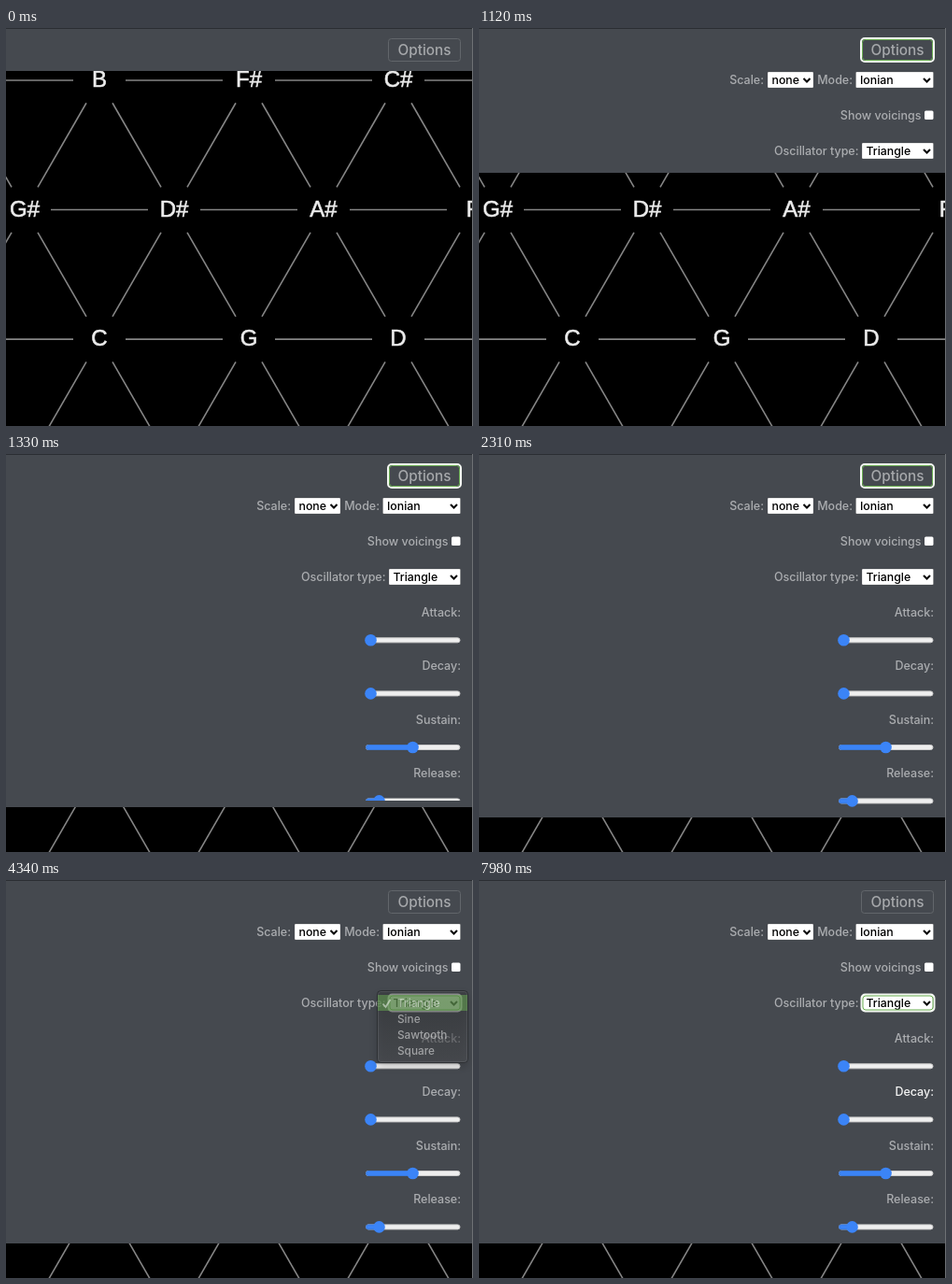
An HTML page with a canvas that plays this animation: 500x426 px, repeating every 8 s.

```html
<!DOCTYPE html>
<html lang="en">
<head>
<meta charset="utf-8">
<title>Note lattice options</title>
<style>
  html, body { margin: 0; width: 100%; height: 100%; overflow: hidden; background: #000; }
  canvas { display: block; }
</style>
</head>
<body>
<canvas id="stage" width="500" height="426"></canvas>
<script>
const c = document.getElementById('stage').getContext('2d');
const LOOP = 8000, STEP = 70;
const SANS = 'Inter, Roboto, sans-serif';
const PANEL = '#45494f', DIM = '#abadb0', GREEN = '#6bb052', BLUE = '#3b84f7';
const OPENING = [46, 56, 155, 271, 343, 378, 389];   // panel bottom per step
const OPEN_AT = 980, MENU_AT = 3290, CLOSE_AT = 4130;

const within = (t, a, b) => t >= a && t < b;

function text(s, x, y, { size = 12.5, color = DIM, align = 'left', weight = 500 } = {}) {
  c.font = `${weight} ${size}px ${SANS}`;
  c.fillStyle = color;
  c.textAlign = align;
  c.fillText(s, x, y);
}

function box(x, y, w, h, r, fill, stroke, line = 1) {
  c.beginPath();
  c.roundRect(x, y, w, h, r);
  if (fill) { c.fillStyle = fill; c.fill(); }
  if (stroke) { c.strokeStyle = stroke; c.lineWidth = line; c.stroke(); }
}

function path(points, color, width) {
  c.beginPath();
  points.forEach(([x, y]) => c.lineTo(x, y));
  c.strokeStyle = color;
  c.lineWidth = width;
  c.stroke();
}

function noteName(s, x, y) {
  c.font = '24px "Liberation Sans", Arial, sans-serif';
  c.textAlign = 'center';
  c.fillStyle = c.strokeStyle = '#ececec';
  c.lineWidth = 0.6;
  c.fillText(s, x, y);
  c.strokeText(s, x, y);
}

function lattice() {
  const side = 160, rise = side * Math.sqrt(3) / 2, gap = 28 / side;
  const rows = [['E', 'B', 'F#', 'C#', 'G#'], ['G#', 'D#', 'A#', 'F'], ['F', 'C', 'G', 'D', 'A'], ['', '', '', '']];
  rows.forEach((row, j) => row.forEach((note, i) => {
    const x = (j % 2 ? 20 : -60) + i * side, y = 56 + j * rise;
    for (const [dx, dy] of [[side, 0], [side / 2, rise], [-side / 2, rise]])
      path([gap, 1 - gap].map(k => [x + dx * k, y + dy * k]), '#858585', 1.6);
    noteName(note, x, y + 7.2);
  }));
}

function focusRing(x, y, w, h) {
  box(x, y, w, h, 4, null, '#f4f8f2', 2);
  box(x + 1.5, y + 1.5, w - 3, h - 3, 3, null, GREEN, 1);
}

function select(label, x, y, w) {
  box(x, y, w, 17, 1, '#fff', 'rgba(90,90,90,.5)', 0.5);
  text(label, x + 4.5, y + 13, { size: 12.3, color: '#000' });
  const a = x + w - 10.5;
  path([[a, y + 7], [a + 3.5, y + 10.5], [a + 7, y + 7]], '#000', 2);
}

function slider(label, y, value, bright, hover) {
  text(label, 487, y - 25, { align: 'right', color: bright ? '#f4f4f4' : DIM });
  const x = 390.5 + value * 90;
  box(385.5, y - 2.5, 100.5, 5, 2.5, hover ? '#dadada' : '#efefef', hover ? '#b8b8b8' : '#cbcbcb');
  box(385.5, y - 2.5, x - 385, 5, 2.5, BLUE, '#3a78d8');
  box(x - 6.3, y - 6.3, 12.6, 12.6, 6.3, BLUE);
}

function menu(t) {
  const fade = 1 - Math.max(0, t - CLOSE_AT - STEP) / 280;
  if (t < MENU_AT || fade <= 0) return;
  const row = within(t, 3710, 3780) ? 1 : within(t, 3780, 3850) ? 2 : 0;
  const fill = c.createLinearGradient(0, 119, 0, 195);
  fill.addColorStop(0, '#37393c');
  fill.addColorStop(1, '#515357');
  c.save();
  c.globalAlpha = fade;
  c.shadowColor = 'rgba(0,0,0,.4)';
  c.shadowBlur = 10;
  c.shadowOffsetY = 4;
  box(397.5, 118.5, 97, 77, 4, fill);
  c.shadowColor = 'transparent';
  box(397.5, 118.5, 97, 77, 4, null, '#1b1d1f');
  box(398.5, 119.5, 95, 75, 3, null, '#696b6f', 0.8);
  if (!within(t, CLOSE_AT, CLOSE_AT + STEP)) {
    c.fillStyle = GREEN;
    c.fillRect(398, 123 + row * 17, 96, 17);
  }
  ['Triangle', 'Sine', 'Sawtooth', 'Square'].forEach((s, i) =>
    text(s, 419, 136 + i * 17, { color: '#fff', size: 11.8 }));
  path([[403.5, 132.5], [406.5, 136], [411.5, 128]], '#fff', 1.8);
  c.restore();
}

function controls(t) {
  const attack = within(t, 5390, 6370) || within(t, 6790, 7000);
  const attackHover = within(t, 5530, 6090) || within(t, 6860, 7140);
  const decay = within(t, 6370, 6580) || t >= 7000;
  text('Scale:', 305, 60, { align: 'right' });
  select('none', 309, 47, 49);
  text('Mode:', 400, 60, { align: 'right' });
  select('Ionian', 403.5, 47, 83);
  text('Show voicings', 473.5, 98, { align: 'right' });
  box(477, 88.5, 9.5, 9.5, 1.5, '#fff');
  text('Oscillator type:', 406.5, 136, { align: 'right' });
  select('Triangle', 410, 123, 76.5);
  if (t >= 3430) focusRing(409.5, 122.5, 78, 18);
  slider('Attack:', 199.3, 0, attack, attackHover);
  slider('Decay:', 256.4, 0, decay, false);
  slider('Sustain:', 314, 0.5, false, false);
  slider('Release:', 371.4, 0.1, false, false);
}

function draw(t) {
  c.fillStyle = '#000';
  c.fillRect(0, 0, 500, 426);
  lattice();

  const step = Math.floor((t - OPEN_AT) / STEP);
  const bottom = OPENING[Math.max(0, Math.min(step, OPENING.length - 1))];
  c.fillStyle = PANEL;
  c.fillRect(0, 0, 500, bottom);
  c.fillStyle = '#2b2e32';
  c.fillRect(0, 0, 500, 1);
  c.fillStyle = '#6e7175';
  c.fillRect(499, 0, 1, 426);

  box(409.5, 11.5, 77, 24, 3, null, '#62666b');
  text('Options', 448, 29, { size: 15.3, align: 'center', color: '#a6a8ab' });
  if (within(t, OPEN_AT, MENU_AT)) focusRing(409, 11, 78, 25);

  if (step > 0) {
    c.save();
    c.beginPath();
    c.rect(0, 40, 500, bottom - (bottom < 389 ? 7 : 0) - 40);
    c.clip();
    controls(t);
    c.restore();
  }
  menu(t);
}

function frame(now) {
  draw(now % LOOP);
  requestAnimationFrame(frame);
}
requestAnimationFrame(frame);
</script>
</body>
</html>
```
